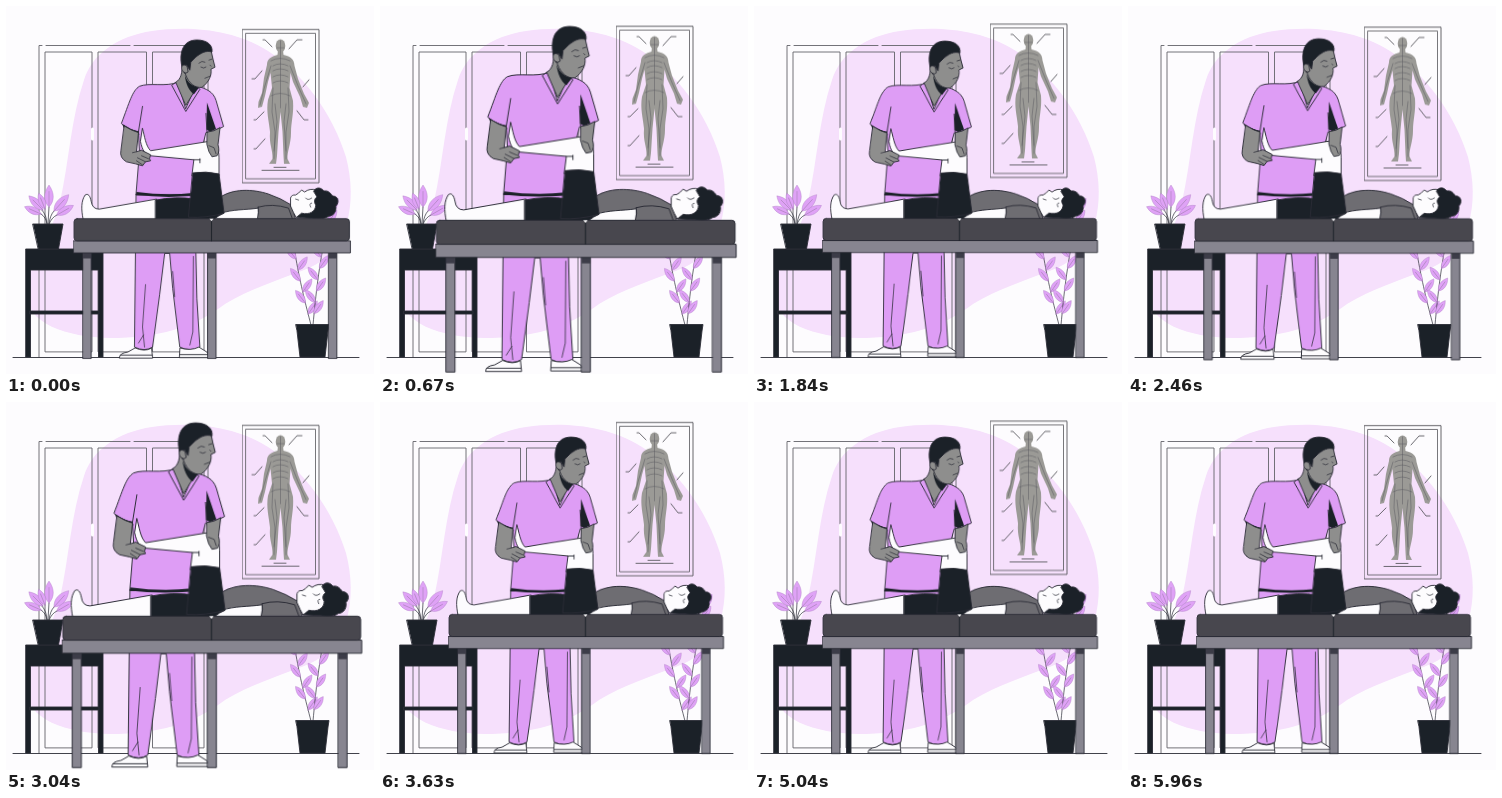
Animation of 368 by 368 pixels, one loop 6000 ms. Source, as an HTML page:

```html
<!DOCTYPE html>
<html lang="en">
<head>
<meta charset="utf-8">
<title>Physiotherapy</title>
<style>
  html, body { margin: 0; width: 100%; height: 100%; overflow: hidden; background: #fdfcfe; }
  svg { display: block; width: 100vw; height: 100vh; }
  #care { transform-origin: 206px 193.5px; }
  .line { fill: none; }
  .thin { stroke-width: .7; }
  .ink { fill: #1b2128; }
  .white { fill: #fdfcfe; }
  .skin { fill: #8e8e8d; }
  .scrub { fill: #de9df5; }
  .shirt { fill: #6e6d72; }
  .wood { fill: #878590; }
  .leaf { fill: #dfa2f6; stroke: #b184c6; stroke-width: .4; }
  .flat { stroke: none; }
</style>
</head>
<body>
<svg viewBox="0 0 368 368" stroke="#2c2d37" stroke-width=".9" stroke-linejoin="round" stroke-linecap="round">
  <path class="flat" fill="#f6e0fc" d="M78 74C86 48 112 30 146 25C180 20 226 22 262 45C296 66 327 108 340 151C352 197 342 246 303 262C273 274 243 283 219 298C188 322 151 332 104 332C61 331 20 318 20 286C21 254 44 235 54 196C63 156 65 112 78 74Z"/>

  <g id="door" class="line" stroke="#64646a" stroke-width=".9">
    <path d="M33 351V39.500H36M40 39.500H124M128 39.500H202V351"/>
    <path d="M39 345.500V46H86V345.500ZM92 345.500V46H140.500V345.500ZM146.500 345.500V46H198V345.500Z"/>
    <path stroke="#fdfcfe" stroke-width="3" d="M86.500 123V133"/>
  </g>

  <g id="poster">
    <g class="line" stroke="#55555a">
      <path d="M236.500 23.700H313V177H236.500Z"/>
      <path d="M240 27.500H309.500V173H240Z" stroke-width=".8"/>
    </g>
    <g id="figure" class="flat" fill="#9b9a96">
      <ellipse cx="274.500" cy="40" rx="4.800" ry="6.600"/>
      <path d="M272 44H277L277.500 49C285 51 288 53 288.500 60L292 73L298 88L303 97L301 102L297 101L294 91L287 76L284.500 67L283.500 82L287 95C288 108 285 116 285 127C285 138 281 146 281.500 153L284 158H278L277.500 150L276.500 126L274.500 106L272.500 126L271 150L270 158H263L266.500 153C267 144 263 139 264 126C263 115 260 106 262 94L266 82L264.500 67L262 76L259 90L256 101L252 102L252.500 96L256 87L258 72L261 59C261 53 265 51 271.500 49Z"/>
    </g>
    <g class="line" stroke="#5b5a60" stroke-width=".5">
      <path d="M274.500 35V102M271 42H278M265 55Q274 50 284 55M267 60Q274 56 282 60M267 65Q274 61 282 65M267 71Q274 67 282 71M267 77Q274 73 282 77M265 90Q274 85 284 90M265 60L258 83L254 99M284 60L292 80L300 98M267 82L266 106L269 126L268 153M282 82L283 106L280 126L280 153M269 98L271 116L268 145M280 98L278 116L280 145"/>
      <path stroke-width=".9" d="M257 34H259L266 41M283 43L291 34H296M246 73H249L256 65M297 81L303 74M248 114H250L258 106M291 105L298 114H302M248 143H250L259 133M256 164.500H293M268 161.500H280"/>
    </g>
  </g>

  <path class="line" d="M7 351.500H353"/>

  <g id="stand">
    <path class="ink" d="M20 243H97V351H92.500V264H24.500V351H20Z"/>
    <path class="ink" d="M24 305H93V308H24Z"/>
    <g id="fern"></g>
    <path class="ink" d="M27 218H57L52.500 243H32.500Z"/>
  </g>

  <g id="vine"></g>
  <path class="ink" d="M290 318.500H323L322 325L319 351H294L291 325Z"/>

  <g id="care">
    <g id="therapist">
      <path class="scrub" d="M131 188H187L190 247L191 292L194 340Q184 345 174 340L167 282L164 247H159L154 288L147 340Q139 345 129 340L130 247Z"/>
      <path class="line thin" d="M140 278L137 320L139 340M187.500 250L187 325L184 338M169 290L167 265M133 336L138 328"/>
      <path class="white" d="M130 341Q139 345 146 341L147 351H114Q114 346 122 345Z"/>
      <path class="white" d="M174.500 341Q185 344 193 340L201 345Q204 348 203 350.500H174Z"/>
      <path class="line" d="M115 348H146.500M174 347.500H202"/>

      <path class="scrub" d="M172 77C160 82 144 77 134 81C127 85 124 97 116 118C121 123 127 125 133 126L134 146L130.500 189H187L194 151L200 127C206 126 212 124 217.500 121L210 95C207 86 201 84 190 80L180 103Z"/>
      <path class="ink flat" d="M131 186Q160 190 187 187L186.500 190Q156 192 130.500 189ZM117 118.500Q125 124 133 126L134 129Q125 127 118 122ZM201 97L210 123.500L204 126L200.500 124Z"/>
      <path class="line" d="M133 126L137 101M201 126L200 108"/>
      <path class="skin" d="M176 58C177 68 175 74 170 77L180 100L191 82L187 72Z"/>
      <path class="line" d="M170 77L166 80L180 106L194 84L190 80"/>
      <path class="skin" d="M178 55C181 46 194 40 205 45L207 54L209 62L205 64C206 70 203 77 196 82C189 83 183 78 180 70Z"/>
      <path class="ink" d="M176 61C173 46 178 35 191 35C201 35 207 40 206 47C200 45 195 48 190 52L185 57L184 65L181 60L178 60L179 68Z"/>
      <path class="skin" d="M181 61C176 57 174 64 178 67Q180 69 182 67Z"/>
      <path class="ink flat" d="M179 70C182 78 187 81 193 82.500L188 89C183 85 180 79 179 70Z"/>
      <path class="line thin" d="M193 58Q196 55 199 57M203 55L206 54M195 62Q198 64 200 62M204 60L205 61M199 73L204 71"/>
    </g>

    <g id="patient">
      <path class="white" d="M78 213C76 203 76 195 80 189C83 187 85 190 86 195Q87 203 94 203L151 193V213Z"/>
      <path class="shirt" d="M213 192C226 182 247 183 262 188Q274 192 285 199L289 213H214Z"/>
      <path class="white" d="M215 207C227 203 238 204 252 202V213H208Z"/>
      <path class="shirt" d="M252 201Q266 197 282 202L286 213H251Q253 206 252 201Z"/>
      <path class="white" d="M284 200L284 192Q285 188.500 289 189L292 187L295 184L298 186Q303 182 310 184L314 212H290Q287 207 284 200Z"/>
      <path class="ink" d="M307 185C310 180 315 182 317 185C322 184 324 188 326 190C331 190 333 196 329 200C330 207 325 210 322 210C317 214 308 212 303 212L290 211L295 207C303 209 309 205 309 199Q306 194 310 191Z"/>
      <path class="line thin" d="M299 192Q301 195 305 192M289 193L292 194M304 201Q302 197 305 197"/>
      <path class="ink" d="M150 194Q170 190 189 193L218 207Q213 209 208 213H150Z"/>

      <path class="white" d="M137 123C139 130 140 140 145 145L201 136C209 136 213 142 213 152V170H186L188 154L145 150C139 148 137 145 135 136Z"/>
      <path class="line" d="M188 154H194M194 153V157"/>
      <path class="ink" d="M187 167Q200 165 213 168L218 207Q200 212 183 211Z"/>
    </g>

    <path class="skin" d="M119 120.500Q126 125 133 127L131 146L136 144.500L145 149L144 153L145 155L140 156L137 160L130 158L121 156Q114 152 115.500 145Z"/>
    <path class="line thin" d="M131 146L127 147M136 150L143 153M132 152L140 156M131 155L137 159"/>
    <path class="skin" d="M201.500 126.500Q208 126 214 122L212 139Q214 146 211 150L206 151L203 146L201 139Z"/>
    <path class="line thin" d="M203 140L208 142L210 148"/>

    <g id="bench">
      <path class="wood" d="M78 246H86V351.500H78ZM202 246H210V351.500H202ZM322 246H330V351.500H322Z"/>
      <path class="flat" fill="#3c3c48" d="M78 246H86V252H78ZM202 246H210V252H202ZM322 246H330V252H322Z"/>
      <path class="wood" d="M68.500 234.500H343.500V246.500H68.500Z"/>
      <rect x="69" y="212.500" width="273.500" height="22" rx="3" fill="#48474e"/>
      <path class="line" stroke="#1b2128" d="M205.500 213V234.500"/>
      <path class="white flat" d="M203.500 212.500H207.500L205.500 215Z"/>
    </g>
  </g>
</svg>
<script>
  const byId = id => document.getElementById(id);

  const leaf = (x, y, turn, len, wide = len * .26) => `
    <g transform="translate(${x} ${y}) rotate(${turn})">
      <path class="leaf" d="M0 0C${-wide} ${-len * .25} ${-wide} ${-len * .65} 0 ${-len}C${wide} ${-len * .65} ${wide} ${-len * .25} 0 0Z"/>
      <path class="line" stroke="#9a7aa8" stroke-width=".5" d="M0 0V${-len * .7}"/>
    </g>`;
  const stem = d => `<path class="line thin" d="${d}"/>`;

  // x, y, angle, length of each leaf on the small plant
  const fern = [
    [43, 201, 0, 22], [37, 204, -45, 20], [48, 205, 42, 22],
    [35, 208, -66, 18], [51, 209, 60, 19], [39, 203, -22, 17]
  ];
  byId('fern').innerHTML =
    stem('M42 218L43 201M41 218Q41 209 35 203M43 218Q44 209 48 205M41 218Q40 211 35 208M43 218Q46 211 51 209') +
    fern.map(l => leaf(...l)).join('');

  // leaves alternate along a bending stem
  const vine = (x0, x1, top, bend) => {
    const at = k => [x0 + (x1 - x0) * k + bend * Math.sin(k * Math.PI), 319 + (top - 319) * k];
    const steps = Math.round((319 - top) / 11);
    let parts = stem('M' + Array.from({ length: 21 }, (_, i) => at(i / 20).join(' ')).join('L'));
    for (let i = 1; i <= steps; i++) {
      const [x, y] = at(i / steps);
      parts += leaf(x, y, i === steps ? 30 : i % 2 ? 35 : -38, 16, 4.2);
    }
    return parts;
  };
  byId('vine').innerHTML = vine(305, 288, 242, -1) + vine(307, 324, 206, -2);

  const loop = (id, frames, duration) =>
    byId(id).animate(frames, { duration, delay: -25, iterations: Infinity, easing: 'linear' });

  const beats = [[0, 1], [.1, 1.1], [.3, 1], [.4, 1], [.5, 1.1], [.6, 1], [1, 1]];
  loop('care', beats.map(([offset, s]) => ({ offset, transform: `scale(${s})` })), 6000);
  loop('poster', [0, -7.36, 0].map(y => ({ transform: `translateY(${y}px)` })), 3000);
</script>
</body>
</html>
```
